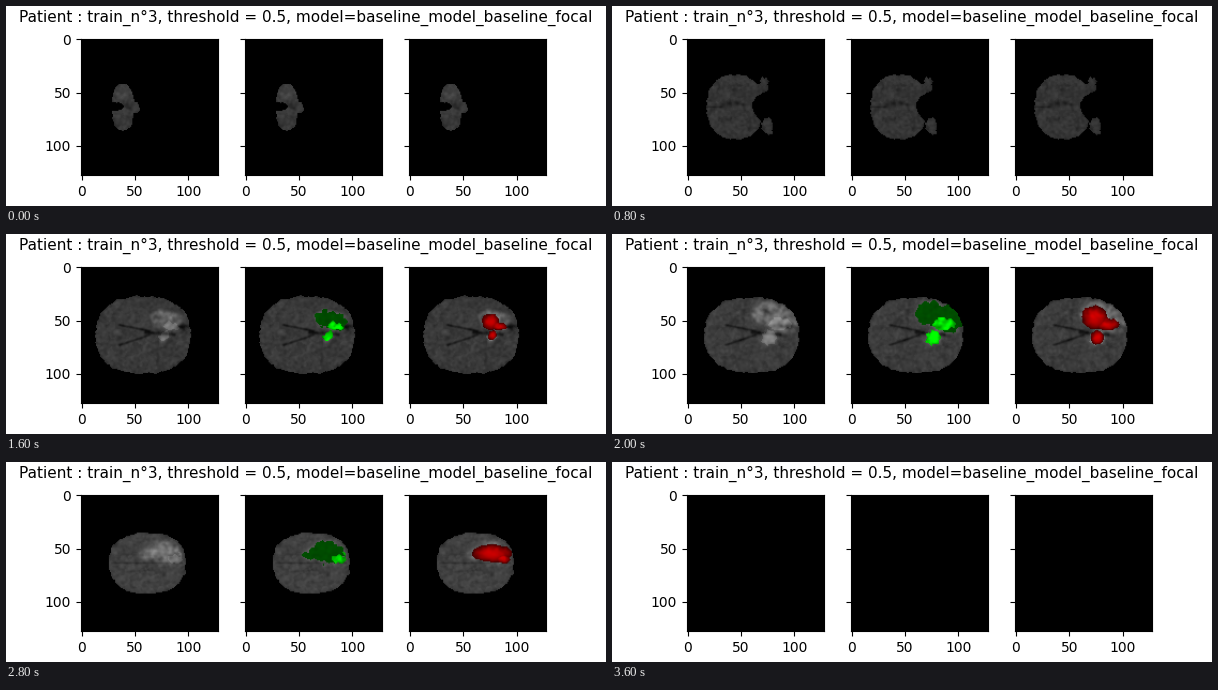
A matplotlib script for the animation above (4 s loop, 600 by 200 pixels).

```python
import numpy as np
import matplotlib.pyplot as plt
from matplotlib.animation import FuncAnimation

N = 128
SIDE = 600 * 0.775 / 3.4          # width of one panel in stage pixels
SLICES, FRAMES, STEP = 18, 20, 200
MID = 101.5                       # height of the midline

# Stage coordinates of every voxel, measured in the left panel
axis = (np.arange(N) + 0.5) * SIDE / N
X, Y = np.meshgrid(75 + axis, 32.6 + axis)

# Ellipses (cx, cy, rx, ry) on slices 10, 12 and 14
LESION_KEYS = 10, 12, 14
EDEMA = [
    [(154, 80, 14, 12), (158, 86, 17, 14), (157, 91, 17, 11)],
    [(173, 85, 13, 14), (148, 93, 18, 6), (147, 93, 14, 5)],
]
CORES = [
    [(157, 104, 6, 7), (170, 95, 10, 8), (168, 97, 7, 4)],
    [(167, 91, 12, 6), (171, 95, 10, 7), (170, 97, 6, 5)],
]
GUESS = [[(155, 84, 13, 12), (158, 89, 20, 13), (158, 92, 20, 9)]]


def dist(e, dx=0, dy=0, p=2):
    """Superellipse distance: 1 on the rim."""
    cx, cy, rx, ry = e
    return (np.abs((X + dx - cx) / rx) ** p + np.abs((Y + dy - cy) / ry) ** p) ** (1 / p)


def spot(*e):
    return np.exp(-dist(e) ** 2)


def stroke(x0, y0, x1, y1, w):
    t = np.clip(((X - x0) * (x1 - x0) + (Y - y0) * (y1 - y0))
                / ((x1 - x0) ** 2 + (y1 - y0) ** 2), 0, 1)
    return np.exp(-((X - x0 - t * (x1 - x0)) ** 2 + (Y - y0 - t * (y1 - y0)) ** 2) / w ** 2)


def blur(a, s):
    f = np.fft.fftfreq(N)
    g = np.exp(-2 * (np.pi * s) ** 2 * (f[:, None] ** 2 + f ** 2))
    return np.fft.ifft2(np.fft.fft2(a) * g).real


def noise(rng, s):
    a = blur(rng.standard_normal((N, N)), s)
    return a / a.std()


def dome(t, p):
    return np.sqrt(1 - np.clip(t, 0, 1) ** p)


def head_mask(k, dx, dy):
    grow = 0, 3, 6, 8, 11
    cx = np.interp(k, grow, (117, 120, 129, 137, 141))
    rx = np.interp(k, grow, (11, 22, 40, 47.5, 48)) * dome((k - 8) / 9.15, 2.4)
    ry = np.interp(k, grow, (23.5, 29.5, 38.5, 38.5, 38.5)) * dome((k - 6.5) / 10.8, 2.7)
    head = dist((cx, MID, rx, ry), dx, dy, 2.4) < 1

    if k < 3:                     # waist between the two lobes
        head &= dist((106, 101, 12, 4.5 - 1.5 * k), dx, dy) > 1
    if k <= 3:                    # brain stem
        head |= dist((129 + 3 * k, 102, 5, 5), dx, dy) < 1
    if 3 < k < 8:                 # gap between the temporal lobes
        gap = (175 + 20 * max(k - 6, 0), MID, 35, 11 * min(8 - k, 2))
        head &= dist(gap, dx, dy) > 1
    if 3 <= k < 6:                # tips of the temporal lobes
        for side in (-1, 1):
            tip = (151.5 + 2.5 * side + 2 * (k - 3), MID - 1.5 + 21 * side, 2 + k, 4 + k)
            head |= dist(tip, 2 * dx, 2 * dy) < 1
    return head


def anatomy(k):
    """Dark cavities and bright structures inside the head."""
    g = 0 * X
    if k < 3:
        g += 8 * spot(116, 88, 7, 6) - 20 * spot(122, 101, 4, 3)
    elif k < 8:
        for x in (110, 118, 125, 132):
            g -= 25 * spot(x, 100 + 2 * np.sin(x), 3, 3)
        if k > 3:
            g += 10 * spot(126, 102, 5, 4) - 20 * stroke(92, MID, 110, MID, 1)
        if k > 4:
            g += 170 * spot(164, 122, 2.5, 3)
    elif k < 12:
        for side in (-1, 1):
            g -= 28 * stroke(114, MID + 10 * side, 143, MID - 2 + 2 * side, 1.4)
        g -= 36 * stroke(140, 99, 168, 101, 1.8) + 60 * spot(174, 93, 6, 3)
    else:
        g -= 16 * stroke(106, MID, 176, MID, 1)
        for side in (-1, 1):
            g -= 8 * stroke(116, MID + 9 * side, 148, MID + 7 * side, 1.2)
    return g


def field(rows, k, size, dx, dy):
    """Union of moving ellipses: 1 at a centre, 0 on the rim."""
    best = np.full((N, N), -1.0)
    for row in rows:
        cx, cy, rx, ry = (np.interp(k, LESION_KEYS, v) for v in zip(*row))
        cx, cy = 160 + (cx - 160) * size, 96 + (cy - 96) * size
        best = np.maximum(best, 1 - dist((cx, cy, rx * size, ry * size), dx, dy) ** 2)
    return best


def tint(gray, mask, level, channel):
    rgb = np.repeat(gray[..., None], 3, 2)
    rgb[mask] = 0
    rgb[mask, channel] = level[mask]
    return rgb


def render(k):
    if k >= SLICES:
        return [np.zeros((N, N, 3), np.uint8)] * 3
    rng = np.random.default_rng(40 + k)
    dx, dy = 0.45 * noise(rng, 1.2), 0.45 * noise(rng, 1.2)

    head = head_mask(k, dx, dy)
    rim = np.clip(0.85 - blur(head.astype(float), 2), 0, 1)
    gray = np.interp(k, (0, 4, 10, 14, 17), (58, 53, 60, 65, 55)) + anatomy(k)
    gray += 4 * noise(rng, 1) + 2.5 * np.sign(noise(rng, 2.2)) - (12 + k) * rim

    size = min(np.clip((k - 6) / 3, 0, 1), np.clip((16 - k) / 2, 0, 1))
    truth = guess = core = np.zeros((N, N), bool)
    glow = heat = 0 * X
    if size > 0:
        rough = 2.5 * dx, 2.5 * dy
        glow = field(CORES, k, size, *rough)
        core = (glow > 0) & head
        truth = (field(EDEMA, k, size, *rough) > 0) & head | core
        heat = field(GUESS + CORES, k, size, dx, dy)
        guess = (heat > 0) & head
        patch = noise(rng, 1.6)
        gray += (45 + 12 * patch) * blur(truth.astype(float), 1.8) + 22 * core
        if k in (11, 12, 13):     # necrotic centre
            hole = spot(168, 95, 5, 3.5)
            gray -= 75 * hole
            glow = glow - 1.2 * hole
        glow = glow + 0.25 * patch

    gray = np.where(head, np.clip(gray, 4, 225), 0)
    green = np.where(core, 165 + 90 * np.clip(glow, -1, 1), 76 + 6 * dx)
    red = 65 + 140 * np.clip(heat, 0, 1) + 10 * dy
    panels = tint(gray, head & False, gray, 0), tint(gray, truth, green, 1), tint(gray, guess, red, 0)
    return [np.clip(p, 0, 255).astype(np.uint8) for p in panels]


fig, axes = plt.subplots(1, 3, sharey=True, figsize=(6, 2), dpi=100)
fig.suptitle("Patient : train_n°3, threshold = 0.5, "
             "model=baseline_model_baseline_focal", fontsize=11)
views = [ax.imshow(p) for ax, p in zip(axes, render(0))]
for ax in axes:
    ax.set_xticks([0, 50, 100])
    ax.set_yticks([0, 50, 100])


def update(k):
    for view, panel in zip(views, render(k)):
        view.set_data(panel)
    return views


anim = FuncAnimation(fig, update, frames=FRAMES, interval=STEP, repeat=True, repeat_delay=0)
plt.show()
```
